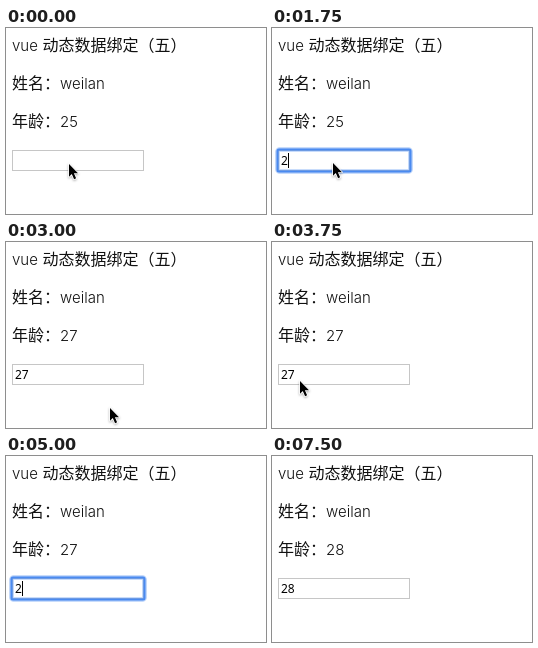
An HTML page for the animation above (7750 ms loop, 260 by 186 pixels).

```html
<!DOCTYPE html>
<html lang="zh-CN">
<head>
<meta charset="utf-8">
<title>vue</title>
<style>
  html, body { margin: 0; width: 100%; height: 100%; overflow: hidden; background: #fff; }
  svg { display: block; width: 260px; height: 186px; overflow: hidden; }
  .page { font: 350 16px "Noto Sans CJK SC", "Noto Sans CJK", sans-serif; fill: #111; }
  .latin { font: 350 15px Inter, sans-serif; }
  .field { font: 12px "Noto Sans", sans-serif; }
  .ring rect { fill: none; stroke: #4a8af0; }
  #cursor { filter: drop-shadow(0 1px 1px rgba(0, 0, 0, .3)); }
</style>
</head>
<body>
<svg viewBox="0 0 260 186">
  <g class="page">
    <text class="latin" x="6" y="23">vue</text><text x="36.4" y="23">动态数据绑定（五）</text>
    <text x="6" y="61">姓名：</text><text class="latin" x="54" y="61">weilan</text>
    <text x="6" y="99">年龄：</text><text id="age" class="latin" x="54" y="99">25</text>
  </g>
  <rect x="6.5" y="122.5" width="131" height="20" fill="#fff" stroke="#c6c6c6"/>
  <g id="ring" class="ring">
    <rect x="5.5" y="121.5" width="133" height="22" rx="2" stroke-width="4.6" opacity=".4"/>
    <rect x="5.5" y="121.5" width="133" height="22" rx="1.5" stroke-width="2"/>
  </g>
  <rect id="selection" x="9" y="125" width="14" height="15" fill="#b4d5fe"/>
  <text id="value" class="field" x="9" y="137"></text>
  <rect id="caret" y="125" width="1" height="15"/>
  <path id="cursor" d="M1 1V13.8L3.8 11.1L6.1 16.2L8.1 15.3L5.9 10.3H10Z"
        stroke="#fff" stroke-width="1.6" stroke-linejoin="round" paint-order="stroke"/>
</svg>
<script>
  const LOOP = 7750;
  const STEP = 250;    // the picture only refreshes this often
  const BEAT = 500;    // time between keys, and half a caret blink
  const DIGIT = 7;

  const edits = [
    { focus: 500, type: 1750, blur: 3000, text: '27' },
    { focus: 4000, type: 5000, blur: 6000, text: '28' }
  ];

  // Each glide eases out from wherever the pointer was; a higher power brakes harder.
  const home = [62, 135];
  const glides = [
    { start: 0, time: 250, to: [60, 134] },
    { start: 2250, time: 500, to: [103, 165] },
    { start: 3000, time: 750, to: [27, 138], power: 2.5 },
    { start: 3750, time: 250, to: [-12, 178] },
    { start: 5250, time: 750, to: [60, 176], power: 3.5 },
    { start: 6000, time: 250, to: [64, 177] },
    { start: 6750, time: 250, to: [64, 190] }
  ];

  function pointer(t) {
    return glides.filter(g => t >= g.start).reduce((pos, { start, time, to, power = 1 }) => {
      const u = Math.min(1, (t - start) / time);
      const k = 1 - (1 - u) ** power;
      return pos.map((p, i) => p + (to[i] - p) * k);
    }, home);
  }

  function field(t) {
    const state = { age: '25', value: '', focus: false, caret: false, selection: false };
    for (const { focus, type, blur, text } of edits) {
      if (t < focus) break;
      const keys = t < type ? 0 : Math.min(text.length, Math.floor((t - type) / BEAT) + 1);
      const last = keys ? type + (keys - 1) * BEAT : focus;
      state.selection = !keys && state.value !== '';
      state.focus = t < blur;
      state.caret = state.focus && !state.selection && Math.floor((t - last) / BEAT) % 2 === 0;
      if (keys) state.value = text.slice(0, keys);
      if (t >= blur) state.age = text;
    }
    return state;
  }

  const el = id => document.getElementById(id);
  const show = (id, on) => el(id).setAttribute('visibility', on ? 'visible' : 'hidden');

  function draw(t) {
    const state = field(t);
    el('age').textContent = state.age;
    el('value').textContent = state.value;
    el('caret').setAttribute('x', 9 + DIGIT * state.value.length);
    show('ring', state.focus);
    show('caret', state.caret);
    show('selection', state.selection);
    el('cursor').setAttribute('transform', `translate(${pointer(t)})`);
  }

  const begin = performance.now();
  function tick() {
    const t = (performance.now() - begin) % LOOP;
    draw(Math.floor(t / STEP) * STEP);
    requestAnimationFrame(tick);
  }
  tick();
</script>
</body>
</html>
```
